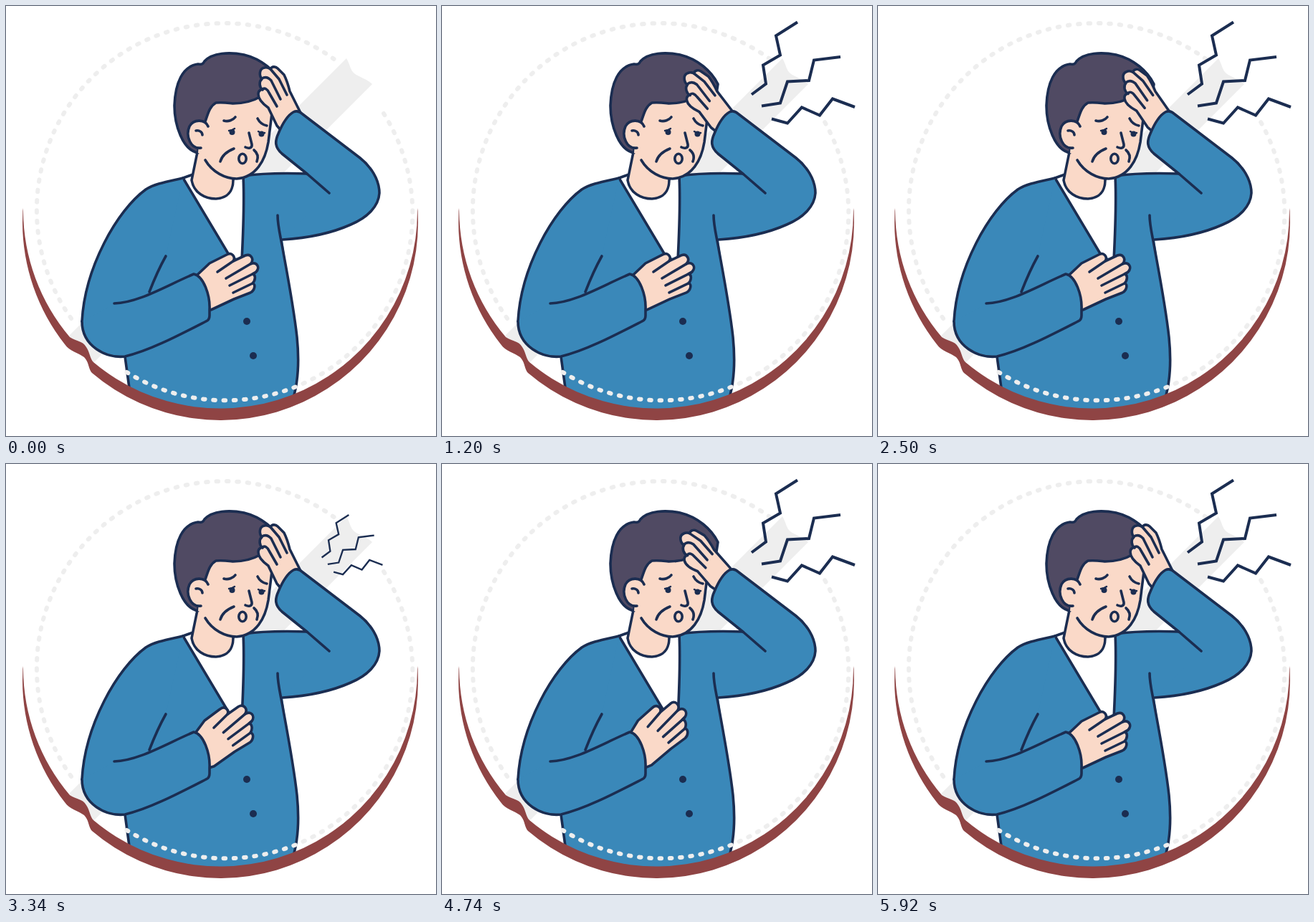
These frames come from a looping animation (600x600 px, 6 s). An HTML page:

```html
<!DOCTYPE html>
<html lang="en">
<head>
<meta charset="utf-8">
<title>Dizzy man</title>
<style>
  html, body { margin: 0; width: 100%; height: 100%; overflow: hidden; background: #fff; }
  svg { display: block; width: 100vw; height: 100vh; }
  .ink { fill: none; stroke: #1b2d51; stroke-width: 3.6; stroke-linecap: round; stroke-linejoin: round; }
  .thin { stroke-width: 2.4; }
  .blue { fill: #3a88b9; }
  .skin { fill: #fad9c8; }
  .hair { fill: #504a63; }
  .white { fill: #fff; }
  .dot { fill: #1b2d51; }
  .dots { fill: none; stroke: #eee; stroke-width: 6; stroke-linecap: round; stroke-dasharray: .18 .82; }
  #bolts { stroke-width: 4; stroke-linecap: butt; stroke-linejoin: miter; }
</style>
</head>
<body>
<svg viewBox="0 0 600 600">
  <path fill="#eee" d="M475 73C480 81 480 89 486 94C492 99 504 102 511 109L120 500L88 460Z"/>

  <!-- torso and raised upper arm -->
  <path class="blue" d="M247 241C225 245 207 248 195 256C155 285 115 365 106 436L166 489L172 534A275 275 0 0 0 402 544C409 520 409 480 404 445C400 415 391 365 386 326C440 322 521 305 521 262L451 261L421 234C390 233 360 233 331 237Z"/>
  <path class="ink" d="M166 489L172 533M379 292C379 308 383 320 387 344C394 382 402 425 406 462C409 492 408 520 402 543"/>
  <path class="ink" d="M331 237C360 233 390 233 421 234"/>
  <path class="white" d="M247 241L261 235L317 240L331 237C333 275 331 315 329 355L311 347Z"/>
  <path class="ink" d="M261 235L247 240L311 347M331 238C333 275 331 315 329 355M331 237L317 241"/>
  <circle class="dot" cx="336" cy="440" r="5"/>
  <circle class="dot" cx="345" cy="488" r="5"/>

  <!-- head -->
  <path class="ink skin" d="M267 204L259 243C262 261 278 269 293 269C309 268 317 258 317 243L317 225"/>
  <path class="skin" d="M268 150L266 205L278 215C288 232 306 241 324 240C349 237 362 215 366 190L371 150L372 110L290 120Z"/>
  <path class="ink" d="M278 215C288 232 306 241 322 241C349 239 362 215 366 190L371 150"/>
  <path class="ink hair" d="M268 205C246 201 235 165 235 139C236 108 246 84 268 81C273 82 275 81 277 77C288 65 312 64 332 68C357 74 376 91 385 109L383 122L356 126C344 133 331 136 317 136C308 135 301 134 293 135C284 140 282 150 278 161L269 175Z"/>
  <path class="skin" d="M268 205L272 160L282 163L282 210Z"/>
  <path class="ink skin" d="M282 168C278 158 262 157 256 168C250 182 258 200 272 198"/>
  <path class="ink" d="M265 174C270 173 274 176 274 180M304 160C310 162 317 159 320 155M351 157C354 163 359 166 364 167M339 177L343 193C344 199 338 199 334 197M318 199C308 203 301 210 299 217M346 201C352 206 352 212 350 217"/>
  <path class="ink thin" d="M311 174Q315 174 319 171M352 175Q356 178 361 177"/>
  <circle class="dot" cx="315.500" cy="176" r="4"/>
  <circle class="dot" cx="356.500" cy="178.500" r="4"/>
  <ellipse class="ink" cx="330" cy="213" rx="5.200" ry="6.700"/>

  <!-- raised hand and forearm -->
  <g id="high" class="ink">
    <path class="skin" d="M400 192L378 167L366 142C359 137 352 130 352 123C352 118 356 116 358 117C353 113 353 105 357 102C353 97 353 87 361 86C364 85 368 87 369 88C371 84 376 84 379 87L388 96C392 104 394 111 396 119L411 149L416 175Z"/>
    <path d="M369 88L381 102L392 124M357 101Q364 97 370 104L383 130M358 116Q363 113 367 121L378 140"/>
  </g>
  <path class="ink blue" d="M451 261L421 235L385 206C375 197 375 189 380 178C385 166 392 153 401 148C405 146 410 147 414 151L494 212C509 224 521 242 521 261C520 279 505 295 481 305C452 318 418 324 386 326"/>

  <!-- chest hand and near arm -->
  <g id="low" class="ink">
    <path class="skin" d="M250 395L266 376L284 359L308 347C315 343 321 350 317 356L334 348C342 345 347 354 341 360C350 356 355 365 349 371L344 374C349 375 348 383 344 387C349 388 347 397 341 400L318 409L286 424L255 428Z"/>
    <path d="M317 356L295 371M341 360L307 380M348 372L312 390M344 387L317 400"/>
  </g>
  <path class="blue" d="M247 241C225 245 207 248 195 256C155 285 110 365 106 440C106 470 140 493 166 489L215 470L200 399L223 349Z"/>
  <path class="ink" d="M247 240C225 245 207 248 195 256C155 285 110 365 106 440"/>
  <path class="ink blue" d="M151 415C185 414 222 391 262 374C276 377 285 404 284 424L284 432C284 436 282 439 279 440C240 460 200 481 166 489C140 492 106 475 106 440"/>
  <path class="ink" d="M223 349C214 365 207 381 200 399"/>

  <!-- ring -->
  <path fill="#8f4444" d="M23.500 282L24 286A275 275 0 0 0 89 462C98 468 107 467 112 476C117 483 117 492 122 497A275 275 0 0 0 574 286L574.500 282L575 302A276 276 0 0 1 120 512C115 507 116 497 109 490C101 484 89 482 82 472A276 276 0 0 1 23 302Z"/>
  <path class="dots" pathLength="49.150" d="M527 150A261 261 0 0 1 168.500 511"/>
  <path class="dots" pathLength="51.150" d="M91 436A261 261 0 0 1 457.500 74"/>

  <g id="bolts" class="ink">
    <path d="M432 123.500L452 108.500L448 82.500L472 68.500L466 41.500L496 22.500"/>
    <path d="M446 139.500L472 135.500L482 105.500L512 104L519 75.500L556 71"/>
    <path d="M460 157.500L482 163.500L502 141.500L527 152.500L545 129.500L576 141"/>
  </g>
</svg>
<script>
  const LOOP = 6000, LAST = 5920, CYCLE = 2980;
  const SWING = 615;
  const byId = id => document.getElementById(id);
  const high = byId('high'), low = byId('low'), bolts = byId('bolts');

  // Steps are [time, value] pairs, eased between neighbours.
  const tracks = {
    bolts: [[0, 0], [645, 1]],
    high: [[0, 0], [667, 0], [1467, -15], [2133, -15], [2933, 0]],
    low: [0, -16, 0, -16, 0].map((angle, i) => [i * SWING, angle])
  };

  function valueAt(steps, t) {
    const next = steps.findIndex(step => step[0] > t);
    if (next < 0) return steps[steps.length - 1][1];
    const [t0, v0] = steps[next - 1], [t1, v1] = steps[next];
    const p = (t - t0) / (t1 - t0);
    return v0 + (v1 - v0) * p * p * (3 - 2 * p);
  }

  function draw(time) {
    const t = Math.min(time % LOOP, LAST) % CYCLE;
    const scale = valueAt(tracks.bolts, t);
    bolts.style.visibility = scale > 0.01 ? 'visible' : 'hidden';
    bolts.setAttribute('transform', `translate(453 140.5) scale(${scale}) translate(-453 -140.5)`);
    high.setAttribute('transform', `rotate(${valueAt(tracks.high, t)} 391 181)`);
    low.setAttribute('transform', `rotate(${valueAt(tracks.low, t)} 275 398)`);
  }

  const start = performance.now();
  function tick() {
    draw(performance.now() - start);
    requestAnimationFrame(tick);
  }
  draw(0);
  requestAnimationFrame(tick);
</script>
</body>
</html>
```
